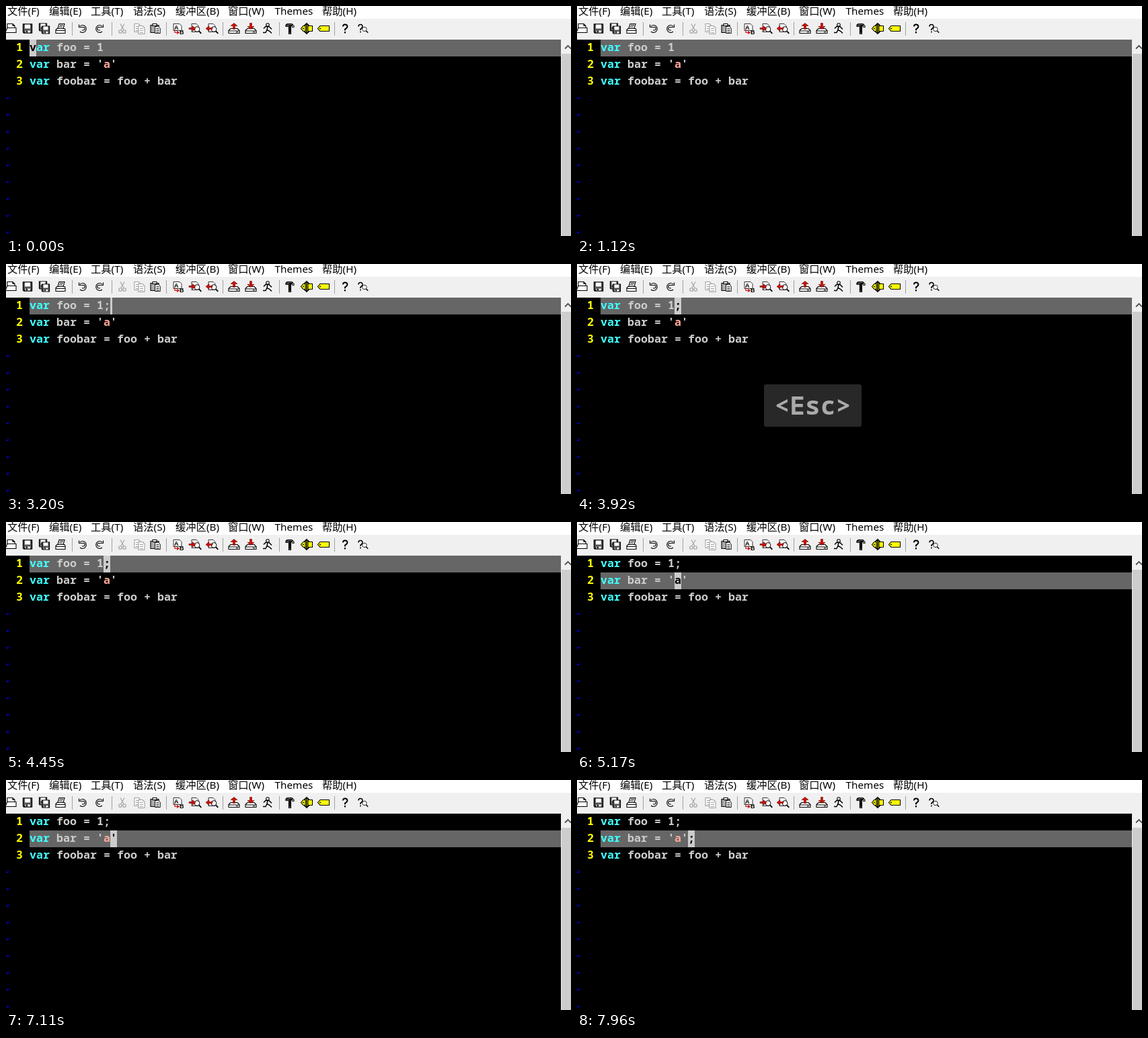
Write an HTML page that moves like this. It is 840 by 342 pixels and loops after 8 s.

```html
<!DOCTYPE html>
<html lang="zh">
<head>
<meta charset="utf-8">
<style>
html, body { margin: 0; width: 100%; height: 100%; overflow: hidden; background: #000; }
svg { display: block; }
.menu { font: 15.3px "Noto Sans", "Noto Sans CJK SC", "Noto Sans CJK", sans-serif; fill: #000; }
.code { font: 600 16.667px "Noto Sans Mono", monospace; white-space: pre; fill: #ccc; }
.num { fill: #ff0; font-weight: 700; }
.kw { fill: #40ffff; font-weight: 700; }
.str { fill: #ffa898; }
.blank { fill: #00f; font-weight: 900; }
.key { font: 700 38px "Noto Sans Mono", monospace; fill: #fff; text-anchor: middle; }
.ico { fill: none; stroke: #000; stroke-width: 1.1; }
</style>
</head>
<body>
<svg id="stage" width="840" height="342" viewBox="0 0 840 342">
  <rect width="840" height="342"/>
  <rect width="840" height="19" fill="#fff"/>
  <rect y="19" width="840" height="31" fill="#f0f0f0"/>
  <g id="menu" class="menu"></g>
  <g id="tools"></g>
  <rect id="line" x="35" width="790" height="25" fill="#666"/>
  <g id="rows" class="code"></g>
  <rect id="cursor" height="25" fill="#ccc"/>
  <text id="under" class="code" style="fill:#000"></text>
  <rect x="825" y="50" width="15" height="292" fill="#f0f0f0"/>
  <rect x="826" y="71" width="14" height="271" fill="#cdcdcd"/>
  <path d="M831 63.5l4.5-4.5 4.5 4.5" fill="none" stroke="#505050" stroke-width="1.8"/>
  <g id="label">
    <rect id="box" y="179" height="63" rx="3" fill="#4b4b4b" fill-opacity=".8"/>
    <text id="key" class="key" y="224"></text>
  </g>
</svg>
<script>
const LOOP = 8000, CELL = 10, ROW = 25, LEFT = 35, TOP = 50;
const $ = id => document.getElementById(id);
const set = (el, attrs) => { for (const k in attrs) el.setAttribute(k, attrs[k]); };
const esc = s => s.replace(/</g, '&lt;');

const menu = [[2, '文件(F)'], [64, '编辑(E)'], [126, '工具(T)'], [189, '语法(S)'],
  [252, '缓冲区(B)'], [330, '窗口(W)'], [399.5, 'Themes'], [470, '帮助(H)']];
$('menu').innerHTML = menu.map(([x, s]) => `<text x="${x}" y="13">${s}</text>`).join('');

// Toolbar icons, each drawn around its own centre
const path = (d, extra = '') => `<path d="${d}" ${extra}/>`;
const at = (x, y, k, art) => `<g transform="translate(${x} ${y}) scale(${k})">${art}</g>`;
const red = 'fill="#d01000" stroke="#600" stroke-width=".6"';
const solid = 'fill="#000" stroke="none"';
const white = 'fill="#fff"';
const grey = 'stroke="#a0a0a0"';
const floppy = path('M-6.5-6.5H6.5V6.5H-5.5L-6.5 5.5Z', 'fill="#555" stroke-width="1.4"') +
  path('M-4-6H4V0H-4ZM-3 3H4V6H-3Z', 'fill="#fff" stroke="none"') + path('M-2 3H0V6H-2Z', solid);
const lens = path('M3 3L7 7', 'stroke-width="2"') + '<circle r="4.3" fill="#fff"/>';
const tray = path('M-8 3L-5 0H5L8 3V7H-8Z', white) + path('M-8 3.5H8M3 5.3H6');
const tag = path('M-8.5 0L-5-4H8.5V4H-5Z', 'fill="#ff0"') + path('M-6 0H-4', 'stroke-width="1.5"');
const turn = path('M-4-3.5A5.5 5.5 0 1 1-4 4.5M-5.5-6V-2H-1.5') + path('M-2-2H1A2.2 2.2 0 0 1 1 2.5H-1');
const sheet = path('M-4-6H2L5-3V6H-4Z', white);
const lines = path('M-2-2H3M-2 1H3M-2 4H3');

const icons = [
  [7, path('M-5 0V-7H3L6-4V0M3-7V-4H6', white) + path('M-8 6L-5-1H8V6Z', white)],
  [32, floppy],
  [57, at(-2, -2, .85, floppy) + at(2, 2, .85, floppy)],
  [81, path('M-4 0L-2-7H6L4 0', white) + path('M-7 2L-5 0H6L7 2V7H-7Z', white) + path('M-1-5H4M-2-2.5H3M-7 3H7')],
  [114, turn],
  [139, `<g transform="scale(-1 1)">${turn}</g>`],
  [173, `<g ${grey}>${path('M-3-7L2 2M3-7L-2 2')}<circle cx="-3" cy="4.5" r="2.3"/><circle cx="3" cy="4.5" r="2.3"/></g>`],
  [198, `<g ${grey}>${at(-3, -1, 1, sheet + lines) + at(3, 2, 1, sheet + lines)}</g>`],
  [222, path('M-7-5H5V6H-7Z', 'fill="#aaa"') + path('M-4-7H2V-4H-4Z', white) + at(3, 2, .85, sheet + lines)],
  [256, path('M-7-7H2L5-4V3H-7Z', white + ' stroke-width=".8"') +
    '<g font-family="Liberation Sans, sans-serif" font-size="9" font-weight="700" fill="#000" stroke="none"><text x="-6" y="1">A</text><text x="2" y="8">B</text></g>' +
    path('M-5 2V6H0M-2 4L1 6L-2 8', 'stroke="#c00"')],
  [281, path('M-5-7H2L5-4V5H-5Z', white + ' stroke-width=".8"') + at(3, 1, .9, lens) + path('M-9-1H-4V-4L1 0L-4 4V1H-9Z', red)],
  [306, path('M-5-7H2L5-4V5H-5Z', white + ' stroke-width=".8"') + at(3, 1, .9, lens) + path('M1-1H-4V-4L-9 0L-4 4V1H1Z', red)],
  [339, tray + path('M-1.5 1V-4H-5L0-8L5-4H1.5V1Z', red)],
  [364, tray + path('M-1.5-8V-3H-5L0 1L5-3H1.5V-8Z', red)],
  [389, '<circle cx="0" cy="-5.5" r="2.3" fill="#fff"/>' + path('M-6 0L-3-3H2L6 1M0-3L-1 2L3 4L6 7M-1 2L-3 6H-7', 'stroke-width="1.5"')],
  [422, path('M-6-5L-4-7H3L6-4V-2H4L3-4H1.5V8H-1.5V-3H-4L-6-3Z', 'fill="#fff"') + path('M-6-5H4M0-4V7', 'stroke-width="1.8"')],
  [447, tag + path('M-4-4L0-8L4-4M-4 4L0 8L4 4') + path('M-2-6H2V6H-2Z', 'fill="#ff0"') + path('M0-6V7', 'stroke-width="1.5"')],
  [472, tag],
  [504, path('M-3-3Q-3-6 0-6Q3.5-6 3.5-3Q3.5-1 0 1V3M0 4.5V7', 'stroke-width="1.9"')],
  [530, path('M-6-3Q-6-6-3-6Q0-6 0-3Q0-1-3 1V2.5M-3 4V6', 'stroke-width="1.6"') + at(3, 1, .75, lens)]
];
const bars = [98, 157, 238, 322, 406, 488];
$('tools').innerHTML =
  icons.map(([x, art]) => `<g class="ico" transform="translate(${x} 33.5)">${art}</g>`).join('') +
  bars.map(x => `<rect x="${x}" y="24" width="1" height="20" fill="#a0a0a0"/>`).join('');

// Editor text
const code = ["var foo = 1", "var bar = 'a'", "var foobar = foo + bar"];
const paint = s => esc(s).replace(/^var/, '<tspan class="kw">var</tspan>')
  .replace(/'a'/, `'<tspan class="str">a</tspan>'`);
const base = r => TOP + r * ROW + 17;
const blanks = Array.from({ length: 9 }, (_, i) => `<text class="blank" x="-5" y="${base(i + 3) + 1}">~</text>`);
$('rows').innerHTML = code.map((_, r) =>
  `<text class="num" x="15" y="${base(r)}">${r + 1}</text><text id="row${r}" x="${LEFT}" y="${base(r)}"></text>`
).join('') + blanks.join('');

// Cursor: start time, row, column, shape ('' while blinked off)
const cursor = [
  [0, 0, 0, 'block'], [420, 0, 10, 'block'], [1120, 0, 10, ''],
  [1290, 0, 11, 'bar'], [1970, 0, 11, ''], [2200, 0, 11, 'bar'], [2880, 0, 11, ''], [3130, 0, 11, 'bar'],
  [3200, 0, 12, 'bar'], [3520, 0, 11, 'block'], [4220, 0, 11, ''], [4450, 0, 11, 'block'],
  [4620, 1, 11, 'block'], [5320, 1, 11, ''], [5550, 1, 11, 'block'],
  [5870, 1, 12, 'block'], [6570, 1, 12, ''], [6630, 1, 12, 'block'], [6780, 1, 12, ''], [7110, 1, 12, 'block'],
  [7380, 1, 13, 'block']
];
// Key label: text, shown at, fade from, fade to, fade steps
const keys = [
  ['$', 420, 870, 970, 2], ['a', 1290, 1670, 1820, 3], [';', 2200, 2630, 2780, 3],
  ['<Esc>', 3520, 3920, 4080, 3], ['j', 4620, 5020, 5170, 3],
  ['$', 5870, 6330, 6480, 3], ['.', 7380, 7780, 7960, 3]
];
const semicolonAt = [3200, 7380, Infinity];

function fade(t, from, to, steps) {
  if (t < from) return 1;
  const i = Math.floor((t - from) / (to - from) * (steps - 1) + 1e-6);
  return Math.max(0, 1 - (i + 1) / steps);
}

function draw(t) {
  const text = code.map((s, r) => t >= semicolonAt[r] ? s + ';' : s);
  text.forEach((s, r) => {
    const el = $('row' + r);
    if (el.dataset.s !== s) { el.dataset.s = s; el.innerHTML = paint(s); }
  });

  const [, row, col, shape] = cursor.filter(c => c[0] <= t).pop();
  const x = LEFT + col * CELL, y = TOP + row * ROW;
  set($('line'), { y });
  set($('cursor'), { x, y, width: shape === 'block' ? CELL : shape === 'bar' ? 3 : 0 });
  set($('under'), { x, y: base(row) });
  $('under').textContent = shape === 'block' ? text[row][col] : '';

  const key = keys.filter(k => k[1] <= t).pop();
  const alpha = key ? fade(t, ...key.slice(2)) : 0;
  set($('label'), { opacity: alpha });
  if (alpha) {
    const width = key[0].length > 1 ? 145 : 50;
    set($('box'), { x: 423 - width, width });
    set($('key'), { x: 423 - width / 2 });
    $('key').textContent = key[0];
  }
}

const start = performance.now();
function tick() {
  draw((performance.now() - start) % LOOP);
  requestAnimationFrame(tick);
}
draw(0);
requestAnimationFrame(tick);
</script>
</body>
</html>
```
